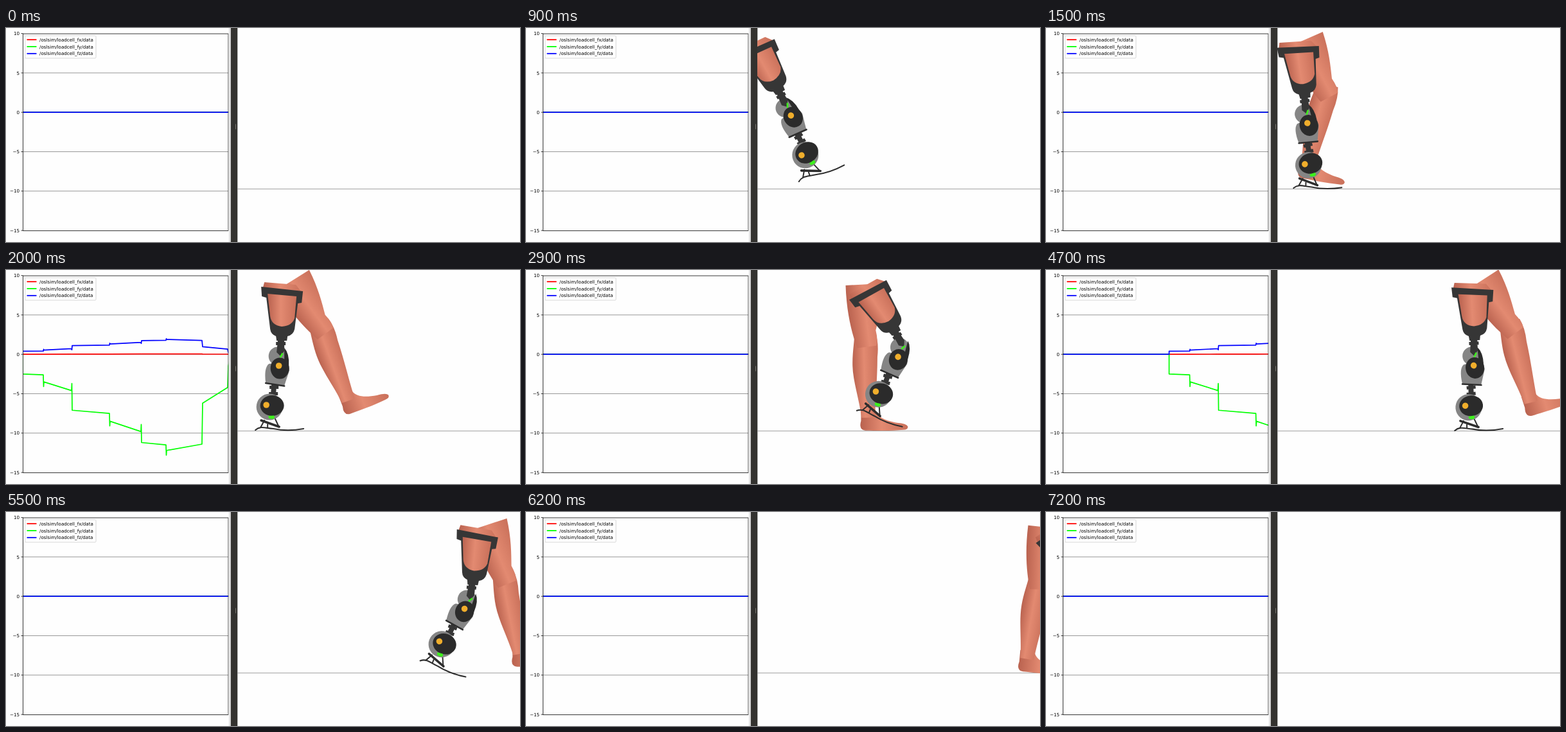
An HTML page that plays this animation: 800x333 px, repeating every 7300 ms.

```html
<!DOCTYPE html>
<html lang="en">
<head>
<meta charset="utf-8">
<title>Load cell gait</title>
<style>
  html, body { margin: 0; width: 100%; height: 100%; overflow: hidden; background: #fefefe; }
  svg { display: block; width: 100vw; height: 100vh; }
  text { font: 7.15px "DejaVu Sans", sans-serif; fill: #000; }
  .dark { fill: #363636; }
  .shell { fill: #858585; }
  .cover { fill: #2b2b2b; }
  .led { fill: #3df01c; }
  .badge { fill: #f0ae2c; }
  .rod { fill: none; stroke: #2e2e2e; stroke-linecap: round; stroke-linejoin: round; }
  .trace { fill: none; stroke-width: 1.7; stroke-linejoin: round; }
</style>
</head>
<body>
<svg viewBox="0 0 800 333">
  <defs>
    <linearGradient id="skin">
      <stop offset="0" stop-color="#b9624f"/>
      <stop offset=".45" stop-color="#e38a71"/>
      <stop offset="1" stop-color="#c9705a"/>
    </linearGradient>
    <linearGradient id="edge">
      <stop offset="0" stop-color="#f2f2f2"/>
      <stop offset="1" stop-color="#c4c4c4"/>
    </linearGradient>
    <clipPath id="plotClip"><rect x="26" y="9" width="320.5" height="306.5"/></clipPath>
    <clipPath id="viewClip"><rect x="360" y="0" width="440" height="333"/></clipPath>
  </defs>
  <rect width="800" height="333" fill="#fefefe"/>

  <g id="grid" stroke="#8c8c8c" stroke-width=".9"></g>
  <g id="labels" text-anchor="end"></g>
  <g clip-path="url(#plotClip)">
    <path class="trace" id="fx" stroke="#f00"/>
    <path class="trace" id="fy" stroke="#0f0"/>
    <path class="trace" id="fz" stroke="#00f"/>
  </g>
  <rect x="26.5" y="9" width="319.5" height="306.5" fill="none" stroke="#222" stroke-width=".9"/>
  <text id="decade" y="326" text-anchor="middle"><tspan id="digit"></tspan> × 10<tspan dy="-2.7" font-size="5">1</tspan></text>
  <rect x="29.5" y="12" width="110.5" height="35" rx="1.5" fill="#fff" fill-opacity=".85" stroke="#ccc" stroke-width=".8"/>
  <g id="legend"></g>

  <rect x="346.5" width="4" height="333" fill="url(#edge)"/>
  <rect x="350" width="10.3" height="333" fill="#33322f"/>
  <path d="M357.5 149.5v8" stroke="#77756f"/>

  <g clip-path="url(#viewClip)">
    <path d="M360 250.5H800" stroke="#a3a3a3"/>
    <g fill="url(#skin)">
      <path id="bioFoot" d="M-11-14H11C14-1 29 4 45 7Q60 8 62 13Q62 18 55 18C35 20 10 19-4 19Q-15 18-11 4Z"/>
      <path id="bioShank" d="M-18-8L15-12Q20 4 17 25C16 60 12 90 11 119H-10C-13 90-22 62-22 38C-22 20-19 5-18-8Z"/>
      <path id="bioThigh" d="M-21 13L38 17C33 48 24 70 17 88Q19 104 15 112H-15C-20 90-25 58-21 13Z"/>
    </g>
    <g id="foot" class="rod">
      <path stroke-width="2.1" d="M-23 38C-15 31-8 35 5 36C20 39 35 39 52 36"/>
      <path stroke-width="3.6" d="M-14 23L14 33"/>
      <path stroke-width="2" d="M7 19L13 32M-9 23L-15 34M-4 29V34"/>
    </g>
    <g id="shank">
      <path class="dark" d="M-12 48H-4L-5 62H-13ZM-15 50H-1V55H-15ZM-16 60H-2V65H-16Z"/>
      <circle class="shell" cx="-15" cy="83" r="20.5"/>
      <ellipse class="cover" cx="-11" cy="81" rx="18.5" ry="16"/>
      <path class="led" d="M-17 97L-8 96.5L-7 100L-10 102L-16 101Z"/>
      <circle class="badge" cx="-20" cy="80" r="4.8"/>
      <circle class="shell" cx="-2" cy="4" r="14.5"/>
      <path class="shell" d="M-16 16Q-24 22-21 46L8 50L16 26L14 12Z"/>
      <path class="cover" d="M8-9Q16 0 15 18L8 12Z"/>
      <ellipse class="cover" cx="1" cy="23" rx="14.5" ry="16.5"/>
      <path class="rod" stroke-width="2.6" d="M-21 46L8 50.5"/>
      <circle class="badge" cx="-.5" cy="19" r="4.8"/>
    </g>
    <g id="thigh">
      <path d="M-29 19L20 23L30 36L-32 30Z" fill="url(#skin)"/>
      <path class="dark" d="M-34 26L31 33L29 51L23 52L18 92Q16 101 7 103L6 110H-10L-11 103Q-19 100-20 92L-26 43L-33 41Z"/>
      <path d="M-24 37L21 41L18 75Q14 87-2 88Q-18 86-20 72Z" fill="url(#skin)"/>
      <path class="dark" d="M-8 108H2V126L-4 134L-10 128ZM-11 112H4V117H-11Z"/>
    </g>
    <path id="kneeLed" d="M1.5 6L5.5-.5" stroke="#3df01c" stroke-width="2.6"/>
  </g>
</svg>
<script>
const $ = id => document.getElementById(id);
const LOOP = 7300, STEP = 100;
const PERIOD = 2.9, STRIDE = 250;
const ZERO = 131.2, UNIT = 12.26, LEFT = 26, RIGHT = 346, SCROLL = 720;

// ---- chart frame
const row = (x, y, s) => `<text x="${x}" y="${y}">${s}</text>`;
for (let v = 10; v >= -15; v -= 5) {
  const y = ZERO - v * UNIT;
  if (v < 10 && v > -15) $('grid').innerHTML += `<path d="M26.5 ${y}H346"/>`;
  $('grid').innerHTML += `<path stroke="#222" d="M23.5 ${y}h3"/>`;
  $('labels').innerHTML += row(21, y + 2.6, String(v).replace('-', '\u2212'));
}
['#f00', '#0f0', '#00f'].forEach((c, i) => {
  const y = 18.2 + i * 10.8;
  $('legend').innerHTML += `<path d="M32.5 ${y}h15" stroke="${c}" stroke-width="1.8"/>` +
    row(52, y + 2.5, `/oslsim/loadcell_f${'xyz'[i]}/data`);
});

// ---- load of one stance: ramps of [start x, first value, last value];
// the other two axes are scaled copies
const RAMPS = [[0, -2.5, -2.6], [33, -3.5, -4.6], [77, -7.1, -7.5], [136, -8.5, -9.8],
  [185, -11.2, -11.5], [224, -12.2, -11.4], [280, -6.2, -4.2], [320, -1.5, 0]];
const GAIN = { fx: -.004, fy: 1, fz: -.155 };
const stanceEnd = n => 2 + 2.93 * n;

function curve(gain, t) {
  let d = `M0 ${ZERO}`;
  for (let n = 0; n < 2; n++) {
    const x0 = LEFT + (stanceEnd(n) - t) * SCROLL;
    const to = (x, v) => d += `L${x0 + x} ${ZERO - v * gain * UNIT}`;
    to(0, 0);
    RAMPS.forEach(([x, a, b], i) => {
      const next = RAMPS[i + 1] || [x + 5];
      to(x, a);
      to(next[0] - 1, b);
      // contact jitter, alternately up and down
      if (i < 5) to(next[0] - .5, i % 2 ? b + .9 : next[1] - .6);
    });
  }
  return d + 'H9999';
}

// ---- gait: angles in degrees at a few phases of the stride
// phase, thigh, shank, foot
const PROSTHESIS = [
  [0, -34, 15, 21],
  [.6, -38, -42, -15],
  [1, -26, -28, -17],
  [1.4, -11, -17, 0],
  [2, 0, 0, 0],
  [2.6, 5, 20, 21]
];
const LEG = [
  [0, -7, -1.5, 0],
  [1, 8, 28, 18],
  [1.3, -12, 45, 42],
  [1.6, -33, 0, -5],
  [2, -36, -20, -21],
  [2.6, -22, -11, 0]
];

// periodic cubic through the keys
function pose(keys, p) {
  const n = keys.length;
  const at = i => keys[(i + n) % n];
  const when = i => at(i)[0] + PERIOD * Math.floor(i / n);
  let i = n - 1;
  while (keys[i][0] > p) i--;
  const h = when(i + 1) - when(i), u = (p - when(i)) / h;
  const slope = (j, c) => (at(j + 1)[c] - at(j - 1)[c]) / (when(j + 1) - when(j - 1)) * h;
  return [1, 2, 3].map(c => {
    const a = at(i)[c], b = at(i + 1)[c], m = slope(i, c), q = slope(i + 1, c);
    return a + u * (m + u * (3 * (b - a) - 2 * m - q + u * (2 * (a - b) + m + q)));
  });
}

function place(id, [x, y], deg) {
  $(id).setAttribute('transform', `translate(${x.toFixed(2)} ${y.toFixed(2)}) rotate(${deg.toFixed(2)})`);
}
function joint([x, y], dx, dy, deg) {
  const a = deg * Math.PI / 180, c = Math.cos(a), s = Math.sin(a);
  return [x + dx * c - dy * s, y + dx * s + dy * c];
}

function walk(t) {
  const p = t % PERIOD;
  const sway = shift => Math.cos(2 * Math.PI * (p - shift) / PERIOD);
  const x = 263.5 + 5 * sway(.4) + STRIDE * t / PERIOD;

  const hip = [x, 3 + 3.5 * sway(.3)];
  const [th, sh, ft] = pose(PROSTHESIS, p);
  const knee = joint(hip, -6, 130, th);
  place('thigh', hip, th);
  place('shank', knee, sh);
  place('kneeLed', knee, sh);
  place('foot', joint(knee, -14, 81, sh), ft);

  const [bt, bs, bf] = pose(LEG, p);
  const bioHip = [x, 8.5], bioKnee = joint(bioHip, 0, 103, bt);
  place('bioThigh', bioHip, bt);
  place('bioShank', bioKnee, bs);
  place('bioFoot', joint(bioKnee, 0, 120, bs), bf);
}

function draw(ms) {
  const t = ms / 1000;
  for (const id in GAIN) $(id).setAttribute('d', curve(GAIN[id], t));

  // decade label rides with the scrolling axis
  const digit = t < 5 ? 7 : 8;
  const x = RIGHT - (t - 3.703 - 2.8 * (digit - 7)) * SCROLL;
  $('digit').textContent = digit;
  $('decade').setAttribute('x', x);
  $('decade').style.display = x > 120 && x < 340 ? '' : 'none';
  walk(t);
}

const start = performance.now();
let shown = -1;
function tick() {
  const ms = Math.floor((performance.now() - start) % LOOP / STEP) * STEP;
  if (ms !== shown) draw(shown = ms);
  requestAnimationFrame(tick);
}
tick();
</script>
</body>
</html>
```
